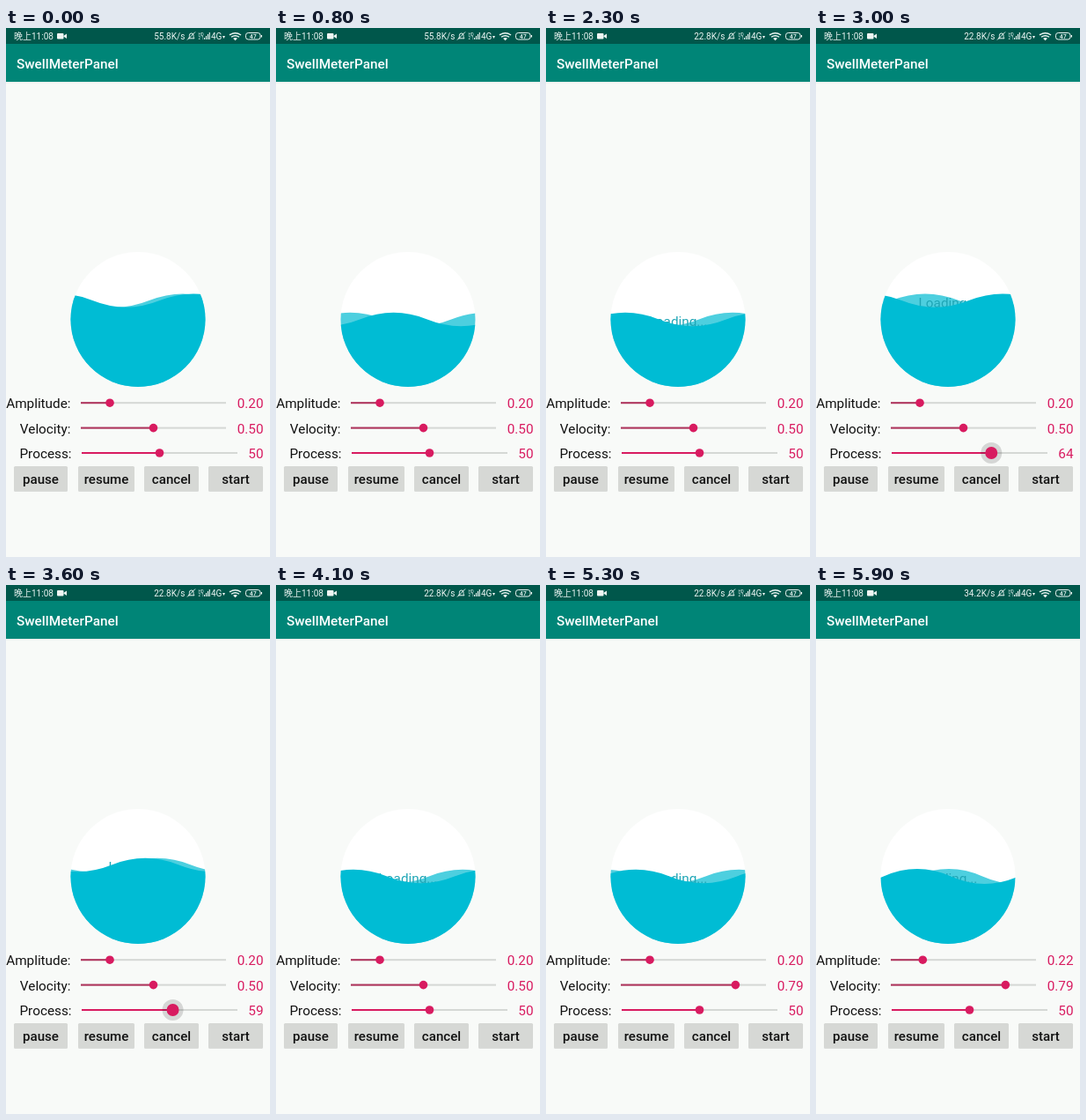
Recreate the animation shown at these times as an HTML page. Size 300 by 600 pixels, loop 6000 ms.

```html
<!DOCTYPE html>
<html lang="zh">
<head>
<meta charset="utf-8">
<title>SwellMeterPanel</title>
<style>
html, body { margin: 0; width: 100%; height: 100%; overflow: hidden; background: #f8faf8; }
svg { display: block; width: 300px; height: 600px; font: 15.3px Roboto, sans-serif; }
.status { font: 10px Roboto, "Noto Sans CJK SC", "Noto Sans CJK JP", sans-serif; fill: #eef5f3; }
.medium { font-weight: 500; }
.end { text-anchor: end; }
.mid { text-anchor: middle; }
.accent { fill: #d81b60; }
.line { fill: none; stroke: #eef5f3; }
</style>
</head>
<body>
<svg viewBox="0 0 300 600">
  <defs>
    <clipPath id="disc"><circle cx="150" cy="330.5" r="76.5"/></clipPath>
    <linearGradient id="shade" x2="0" y2="1">
      <stop stop-opacity=".07"/><stop offset="1" stop-opacity="0"/>
    </linearGradient>
  </defs>
  <rect width="300" height="600" fill="#f8faf8"/>
  <rect y="61" width="300" height="2" fill="url(#shade)"/>
  <rect y="18" width="300" height="43" fill="#008577"/>
  <rect width="300" height="18" fill="#00574b"/>
  <text class="medium" x="12" y="46" fill="#fff">SwellMeterPanel</text>

  <g class="status">
    <text x="9" y="13">晚上11:08</text>
    <rect x="58" y="6" width="7.5" height="6.5" rx="1"/>
    <path d="M65 9.2l4-2.7v5.4z"/>
    <text id="rate" class="end" x="203.3" y="13"></text>
    <path class="line" d="M207.5 11.8h6.5c-1-1-1-2-1-3.5a2.3 2.3 0 0 0-4.6 0c0 1.500 0 2.500-.9 3.500M206 13.500L215 4.500"/>
    <text x="218.500" y="8.500" font-size="4.500">HD</text>
    <text x="218.500" y="13" font-size="4.500">2↑</text>
    <path class="line" d="M225.500 13v-2M227.500 13v-4M229.500 13v-6M231.300 13v-8" stroke-width="1.100"/>
    <text x="233" y="13">4G</text>
    <path d="M246 9h3l-1.500 3z"/>
    <path class="line" d="M254 8q6.500-4.500 13 0M256 10.300q4.500-3.200 9 0" stroke-width="1.400"/>
    <path d="M258 11.800q2.500-1.700 5 0l-2.500 2.400z"/>
    <rect class="line" x="272.500" y="5.500" width="16.500" height="7.500" rx="2.800"/>
    <rect x="289.700" y="8" width="1.300" height="2.500"/>
    <text class="mid medium" x="280.800" y="11.700" font-size="7">47</text>
  </g>

  <circle cx="150" cy="330.5" r="76.5" fill="#fff"/>
  <g clip-path="url(#disc)">
    <path id="back" fill="#4dcfdf"/>
    <text id="label" class="mid" x="150" fill="#1fa6b6">Loading...</text>
    <path id="front" fill="#00bcd4"/>
  </g>
  <g id="controls"></g>
</svg>
<script>
const $ = id => document.getElementById(id);
const LOOP = 6000, STEP = 100, HOLD = 500;
const R = 76.5, CX = 150, CY = 330.5, LEFT = CX - R;

// Tracks are [time, value] points joined by straight lines.
const frontCrest = [[400, 60], [1400, 244], [2300, 396], [3000, 518], [4100, 700], [4400, 757], [4800, 882], [5900, 1186]];
const backCrest = [[400, 48], [1400, 139], [2300, 212], [3000, 277], [4100, 365], [4400, 394], [4800, 455], [5900, 610]];

const sliders = [
  { name: 'Amplitude:', end: 73.5, y: 425.2, x0: 85, x1: 250, max: 1, digits: 2, color: '#b0335c',
    track: [[5400, .2], [5800, .22]], press: [5500, 5800] },
  { name: 'Velocity:', end: 73.5, y: 453.6, x0: 85, x1: 250, max: 1, digits: 2, color: '#b0335c',
    track: [[4200, .5], [4800, .87], [5000, .87], [5300, .79]], press: [4300, 5300] },
  { name: 'Process:', end: 74.5, y: 482, x0: 86, x1: 263, max: 100, digits: 0, color: '#d81b60',
    track: [[2500, 50], [3000, 64], [3300, 67], [3900, 50]], press: [2600, 3900] }
];
const buttons = [['pause', 9, 70], ['resume', 82, 146], ['cancel', 157, 219], ['start', 230, 292]];

function at(track, t) {
  const i = track.findIndex(p => p[0] > t);
  if (i === 0) return track[0][1];
  if (i < 0) return track[track.length - 1][1];
  const [t0, a] = track[i - 1], [t1, b] = track[i];
  return a + (b - a) * (t - t0) / (t1 - t0);
}

function add(tag, attrs, text = '') {
  const el = document.createElementNS('http://www.w3.org/2000/svg', tag);
  for (const k in attrs) el.setAttribute(k, attrs[k]);
  el.textContent = text;
  return $('controls').appendChild(el);
}

function build() {
  for (const s of sliders) {
    const bar = { x: s.x0, y: s.y - 1, height: 2 };
    add('text', { class: 'end', x: s.end, y: s.y + 6, fill: '#111' }, s.name);
    add('rect', { ...bar, width: s.x1 - s.x0, fill: '#d5d8d5' });
    s.fill = add('rect', { ...bar, fill: s.color });
    s.halo = add('circle', { cy: s.y, r: 12, fill: '#000', opacity: .14 });
    s.thumb = add('circle', { cy: s.y, class: 'accent' });
    s.value = add('text', { class: 'end accent', x: 292.5, y: s.y + 6 });
  }
  for (const [name, x0, x1] of buttons) {
    const box = { x: x0, width: x1 - x0, height: 28, rx: 1.5 };
    add('rect', { ...box, y: 498, fill: '#000', opacity: .12 });
    add('rect', { ...box, y: 497, fill: '#d6d8d5' });
    add('text', { class: 'mid medium', x: (x0 + x1) / 2, y: 516.5, fill: '#111', 'font-size': 15.1 }, name);
  }
}

// Parabolic arcs, one wavelength per disc diameter.
function wave(crest, level, amp) {
  const start = LEFT - 4 * R + (crest - R / 2 - LEFT) % (2 * R);
  return `M${start} ${level}q${R / 2} ${-amp * R} ${R} 0` +
    `t${R} 0`.repeat(7) + `V${CY + R}H${start}z`;
}

function draw(t) {
  const [amp, , process] = sliders.map(s => {
    const v = at(s.track, t), x = s.x0 + (s.x1 - s.x0) * v / s.max;
    const pressed = t >= s.press[0] && t < s.press[1];
    s.fill.setAttribute('width', x - s.x0);
    s.thumb.setAttribute('cx', x);
    s.thumb.setAttribute('r', pressed ? 7 : 4.8);
    s.halo.setAttribute('cx', x);
    s.halo.setAttribute('visibility', pressed ? 'visible' : 'hidden');
    s.value.textContent = v.toFixed(s.digits);
    return v;
  });
  const idle = t < HOLD;
  const level = CY + R - 2 * R * (idle ? 64 : process) / 100;
  $('front').setAttribute('d', wave(at(frontCrest, idle ? 0 : t), level, amp));
  $('back').setAttribute('d', wave(at(backCrest, idle ? 0 : t), level, amp));
  $('label').setAttribute('y', level + 7.5);
  $('label').setAttribute('visibility', idle ? 'hidden' : 'visible');
  $('rate').textContent = (t < 1900 ? '55.8' : t < 5400 ? '22.8' : '34.2') + 'K/s';
}

const origin = performance.now();
function tick() {
  const t = (performance.now() - origin) % LOOP;
  draw(Math.floor(t / STEP) * STEP);
  requestAnimationFrame(tick);
}
build();
tick();
</script>
</body>
</html>
```
